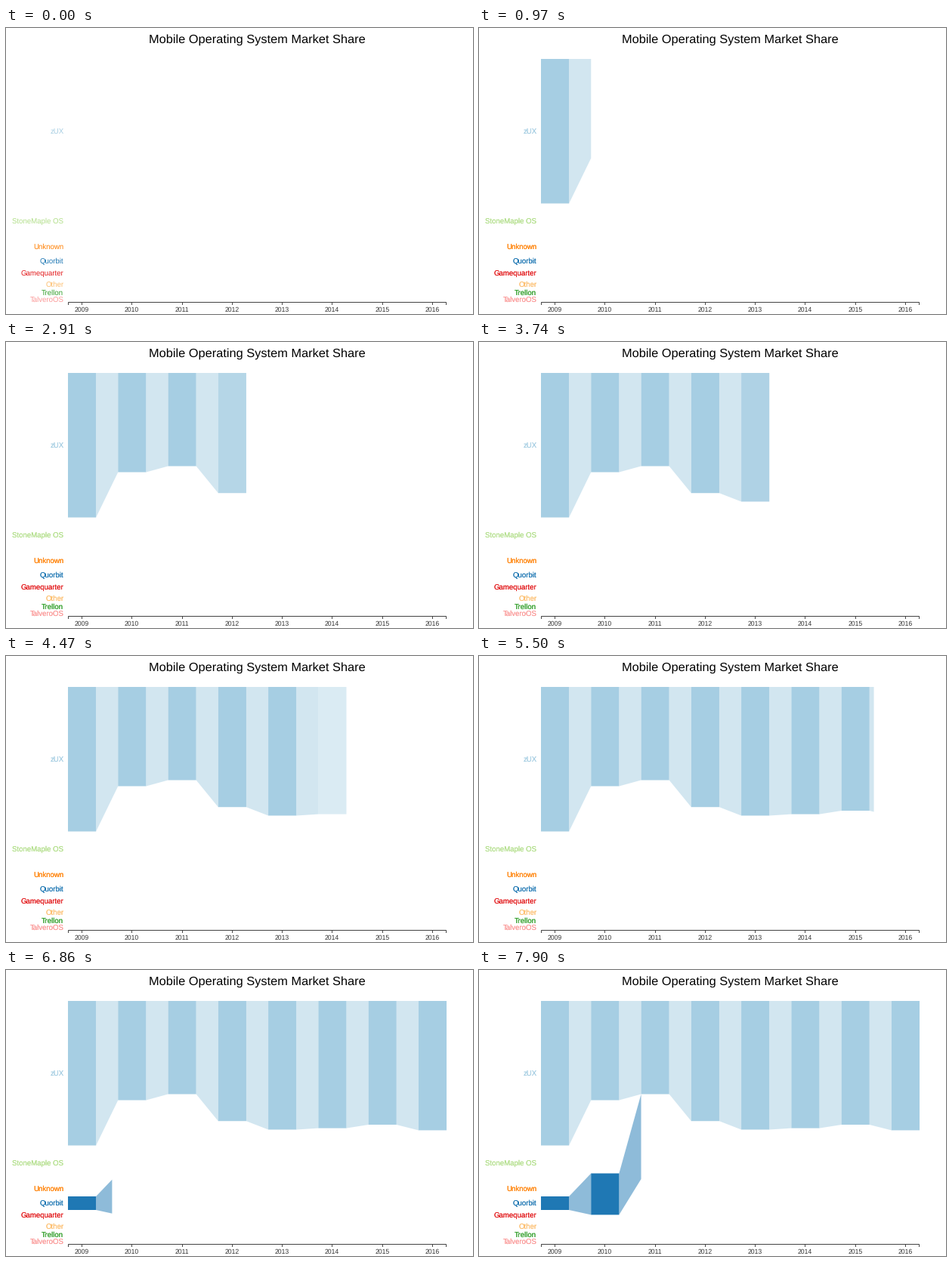
Recreate the animation shown at these times as a matplotlib script. Size 618 px wide and 379 px high, loop 8000 ms.

```python
import math

import matplotlib.pyplot as plt
from matplotlib.animation import FuncAnimation
from matplotlib.patches import Polygon

W, H, DPI = 618, 379, 100
LOOP, STEP = 8000, 20
PX = 72 / DPI

X0, PITCH, BAND = 82, 66.27, 37.13
AXIS_Y = 363.5
FADE = WIPE = 400          # ms for a bar to appear and a link to extend
LINK_DELAY = 263           # ms from the start of a bar to its link
BAR_PERIOD = 817
SERIES_GAP = 453
LABEL_FADE = 120

LABELS = [
    ("zUX", 137, "#a6cee3"),
    ("StoneMaple OS", 256, "#b2df8a"),
    ("Unknown", 290, "#ff7f00"),
    ("Quorbit", 309, "#1f78b4"),
    ("Gamequarter", 326, "#e31a1c"),
    ("Other", 340, "#fdbf6f"),
    ("Trellon", 351, "#33a02c"),
    ("TalveroOS", 360, "#fb9a99"),
]

# Top and bottom of each year's band
SERIES = [
    ("#a6cee3", [(41, y) for y in (232.5, 172.5, 164.5, 200.2,
                                   211.5, 209.6, 205, 212.4)]),
    ("#1f78b4", [(300, 318), (269.5, 324.4), (164.5, 277)]),
]

plt.rcParams["font.family"] = "Liberation Sans"
plt.rcParams["text.hinting"] = "none"
fig = plt.figure(figsize=(W / DPI, H / DPI), dpi=DPI, facecolor="white")
ax = fig.add_axes([0, 0, 1, 1])
ax.set_xlim(0, W)
ax.set_ylim(H, 0)
ax.axis("off")


def ease(t):
    """Cubic in-out, clamped to 0..1."""
    t = min(max(t, 0), 1)
    return 4 * t ** 3 if t < 0.5 else 1 - 4 * (1 - t) ** 3


def text(x, baseline, string, size, color, align="center"):
    return ax.text(x, baseline, string, fontsize=size * PX, color=color,
                   ha=align, va="baseline")


def line(xs, ys):
    ax.plot(xs, ys, color="#444444", lw=PX, snap=False,
            solid_capstyle="butt", solid_joinstyle="miter")


def shape(points, color):
    patch = Polygon(points, closed=True, facecolor=color, edgecolor="none",
                    lw=0, snap=False, visible=False)
    return ax.add_patch(patch)


def band_x(k):
    return X0 + k * PITCH


def draw_axis():
    left, right = 82.5, 582.5
    line([left, left, right, right], [367, AXIS_Y, AXIS_Y, 367])
    for k in range(8):
        x = math.floor(band_x(k) + BAND / 2) + 0.5
        line([x, x], [AXIS_Y, 367])
        text(x - 0.6, 376, str(2009 + k), 8.6, "#333333")


def draw_labels():
    return [text(76.3, y + 3.2, name, 9.7, color, "right")
            for name, y, color in LABELS]


def build_parts():
    bars, links = [], []
    start = 188
    for color, spans in SERIES:
        for k, (top, bottom) in enumerate(spans):
            x = band_x(k)
            end = x + BAND
            bars.append((start, shape([(x, top), (end, top),
                                       (end, bottom), (x, bottom)], color)))
            if k + 1 < len(spans):
                link = shape([(end, top)] * 4, color)
                link.set_alpha(0.5)
                links.append((start + LINK_DELAY, link, end, band_x(k + 1),
                              spans[k], spans[k + 1]))
                start += BAR_PERIOD
        start += SERIES_GAP
    return bars, links


text(332.5, 20, "Mobile Operating System Market Share", 16.4, "black")
draw_axis()
draw_labels()
overlay = draw_labels()    # a second layer that strengthens the labels
bars, links = build_parts()


def update(frame):
    now = frame * STEP
    for label in overlay:
        label.set_alpha(min(now / LABEL_FADE, 1))
    for start, bar in bars:
        bar.set_visible(now > start)
        bar.set_alpha(ease((now - start) / FADE))
    for start, link, xa, xb, (top_a, low_a), (top_b, low_b) in links:
        p = ease((now - start) / WIPE)
        x = xa + (xb - xa) * p
        link.set_visible(p > 0)
        link.set_xy([(xa, top_a), (x, top_a + (top_b - top_a) * p),
                     (x, low_a + (low_b - low_a) * p), (xa, low_a)])
    return overlay


anim = FuncAnimation(fig, update, frames=LOOP // STEP, interval=STEP,
                     repeat=True, repeat_delay=0, blit=False)
plt.show()
```
